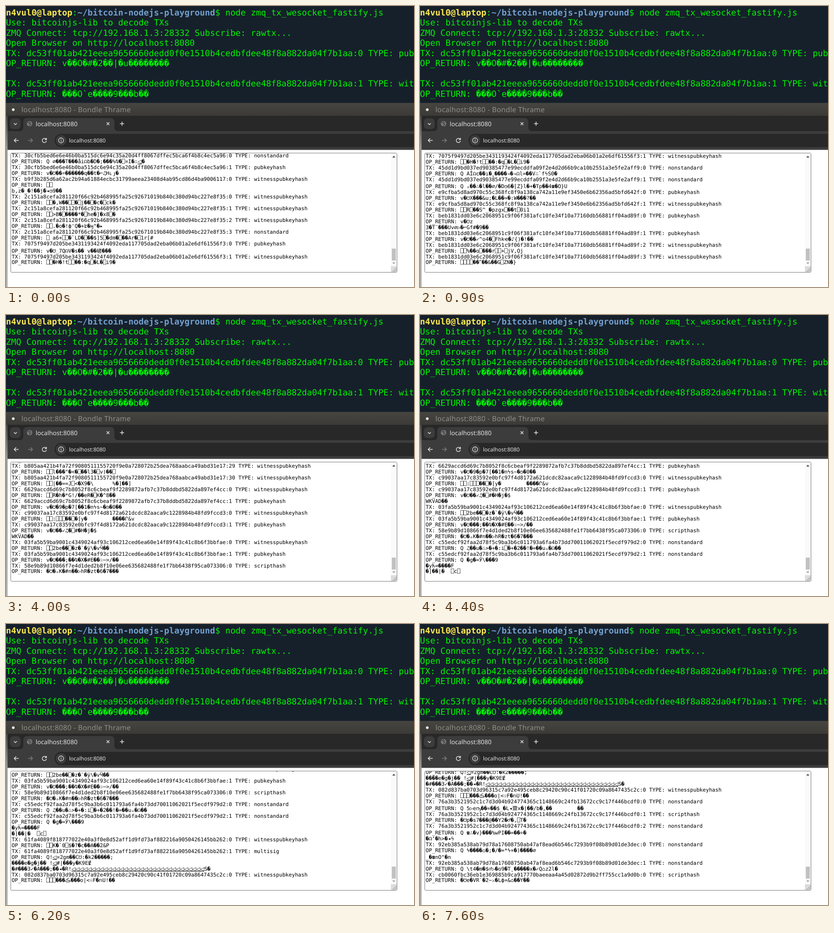
An HTML page for the animation above (8.1 s loop, 900 by 622 pixels).

```html
<!DOCTYPE html>
<html lang="en">
<head>
<meta charset="utf-8">
<title>Transaction log</title>
<style>
html, body { margin: 0; width: 100%; height: 100%; overflow: hidden; background: #fff; }
svg { display: block; width: 900px; height: 622px; }
text { white-space: pre; text-rendering: geometricPrecision; }
.term { font: 18.69px "DejaVu Sans Mono", monospace; fill: #00f200; }
.term .user { font-weight: bold; fill: #fce94f; }
.term .path { font-weight: bold; fill: #729fcf; }
.ui { font-family: "Noto Sans", "Open Sans", sans-serif; fill: #e3e3e3; }
#log { font: 11.54px "DejaVu Sans Mono", "DejaVu Sans", "Noto Sans CJK JP", "Noto Sans CJK", monospace; fill: #000; }
#log text { unicode-bidi: bidi-override; direction: ltr; }
#log .wide { font-family: "DejaVu Sans", sans-serif; text-decoration: underline; text-decoration-thickness: .6px; }
.line { fill: none; stroke: #e3e3e3; stroke-width: 1.5; }
</style>
</head>
<body>
<svg viewBox="0 0 900 622">
  <defs>
    <clipPath id="view"><rect x="11" y="326" width="838" height="263"/></clipPath>
    <linearGradient id="bar" x1="0" y1="0" x2="0" y2="1">
      <stop offset="0" stop-color="#464540"/><stop offset="1" stop-color="#3b3a36"/>
    </linearGradient>
    <linearGradient id="edge" x1="0" y1="0" x2="0" y2="1">
      <stop offset="0" stop-color="#4a4a4a"/><stop offset=".2" stop-color="#9a9a9a"/><stop offset="1" stop-color="#b0b0b0"/>
    </linearGradient>
  </defs>
  <rect width="900" height="622" fill="#fff"/>
  <rect width="900" height="215" fill="#16202b"/>
  <g class="term" id="term">
    <text x="0" y="20.7"><tspan class="user">n4vul0@laptop</tspan>:<tspan class="path">~/bitcoin-nodejs-playground</tspan>$ node zmq_tx_wesocket_fastify.js</text>
  </g>

  <rect y="214.5" width="900" height="29" fill="url(#bar)"/>
  <circle cx="16" cy="229.5" r="3" fill="#e8e8e8"/>
  <text class="ui" x="34" y="234.5" font-size="15.7" font-weight="500" letter-spacing=".3" style="fill:#918f8a">localhost:8080 - Bondle Thrame</text>

  <rect y="243" width="900" height="35" fill="#282828"/>
  <rect y="277" width="900" height="41.5" fill="#3c3c3c"/>
  <path d="M30 277q8 0 8-8V257q0-9 9-9H230q9 0 9 9v12q0 8 8 8z" fill="#3c3c3c"/>
  <rect x="8.5" y="248.5" width="24" height="24" rx="8" fill="#3c3c3c"/>
  <path class="line" d="M17.5 259.5l3.2 3.2 3.2-3.2"/>
  <circle cx="52" cy="260.5" r="6" fill="#77797b"/>
  <path d="M47.5 258q4 0 4 2t4 1M52 266q0-3 3-4M51 255q0 3 4 3" fill="none" stroke="#3c3c3c" stroke-width="1.3"/>
  <text class="ui" x="65.5" y="265.5" font-size="13.6">localhost:8080</text>
  <path class="line" d="M222 257.5l6 6m0-6l-6 6M251.5 260.5h9m-4.5-4.5v9"/>

  <path class="line" d="M28 297.5h-10m4.5-4.5l-4.5 4.5 4.5 4.5"/>
  <path class="line" d="M48.5 297.5h10m-4.5-4.5l4.5 4.5-4.5 4.5" style="stroke:#7c7c7c"/>
  <path class="line" d="M88.5 294.8a4.7 4.7 0 1 0 .8 4M89.3 292v3.7h-3.7"/>
  <rect x="107" y="283" width="830" height="29.5" rx="14.7" fill="#282828"/>
  <circle cx="121.5" cy="297.5" r="11.5" fill="#3c3c3c"/>
  <circle class="line" cx="121.5" cy="297.5" r="5.5" style="stroke-width:1.3"/>
  <path class="line" d="M121.5 296.8v3.7m0-6.2v1.4" style="stroke-width:1.3"/>
  <text class="ui" x="139" y="301.8" font-size="11.95">localhost:8080</text>
  <rect y="243" width="3.5" height="379" fill="url(#edge)"/>

  <rect x="10.5" y="325.5" width="852" height="264" rx="2" fill="#fff" stroke="#767676"/>
  <rect x="849" y="326" width="13" height="250" fill="#fafafa"/>
  <rect x="849" y="576" width="13" height="13" fill="#dcdcdc"/>
  <rect x="851" y="537" width="9" height="26.5" fill="#c1c1c1"/>
  <path d="M852 335.5h7l-3.5-4z" fill="#505050"/>
  <path d="M852 567.5h7l-3.5 4z" fill="#a3a3a3"/>
  <path d="M853 588l8-8m-4 8l4-4" stroke="#7d7d7d" stroke-width="1"/>
  <g clip-path="url(#view)"><g id="log"></g></g>
</svg>
<script>
const LOOP = 8100, PITCH = 12.98, BASE = 571.5;
const NS = 'http://www.w3.org/2000/svg';
const TYPES = { n: 'nonstandard', p: 'pubkeyhash', w: 'witnesspubkeyhash', s: 'scripthash', m: 'multisig' };
const log = document.getElementById('log');
const lines = [];

function add(name, parent, attrs, text) {
  const el = document.createElementNS(NS, name);
  for (const k in attrs) el.setAttribute(k, attrs[k]);
  el.textContent = text;
  return parent.appendChild(el);
}

const hash0 = 'TX: dc53ff01ab421eeea9656660dedd0f0e1510b4cedbfdee48f8a882da04f7b1aa';
[
  'Use: bitcoinjs-lib to decode TXs',
  'ZMQ Connect: tcp://192.168.1.3:28332 Subscribe: rawtx...',
  'Open Browser on http://localhost:8080',
  hash0 + ':0 TYPE: pubkeyhash',
  'OP_RETURN: v��O�#�2��|�u��������',
  '',
  hash0 + ':1 TYPE: witnesspubkeyhash',
  'OP_RETURN: ���O`e����9���b��'
].forEach((s, i) => add('text', document.getElementById('term'), { x: 0, y: 43.2 + 22.5 * i }, s));

// Fallback glyphs make some rows taller.
const extra = s => /[\u4e00-\u9fff]/.test(s) ? 2.6 : s.includes('☎') ? 1.73 : 0;

function addLine(time, s) {
  const last = lines[lines.length - 1];
  const y = (last ? last.y : 0) + PITCH + extra(s);
  const el = add('text', log, { x: 12.6, y }, '');
  for (const part of s.split(/(⊴+)/)) {
    if (part[0] === '⊴') add('tspan', el, { class: 'wide' }, '◁'.repeat(part.length));
    else el.append(part);
  }
  lines.push({ time, y, el });
}

// outs alternates type key and decoded script
function tx(time, hash, first, ...outs) {
  for (let i = 0; i < outs.length; i += 2) {
    addLine(time, `TX: ${hash}:${first + i / 2} TYPE: ${TYPES[outs[i]]}`);
    ('OP_RETURN: ' + outs[i + 1]).split('\n').forEach(s => addLine(time, s));
  }
}

tx(0, '30cfb5bed6e6e46b0ba515dc6e94c35a20d4ff8067dffec5bca6f4b8c4ec5a96', 0,
  'n', 'Q ⌀���T���åi☊b�D�;���%⍉�⎕¤I�∴⊴�',
  'p', 'v�☋��⌕������q��t�⌐♫Hւյ�');
tx(0, 'b9f3b285d6a62ac2b94a61884ecbc31799aeea23408d4ab95cd86d4ba9006117', 0,
  'w', '⎕⎕\nb,z�_�!��j�◂◷9��');
tx(0, '2c151a8cefa281120f66c92b468995fa25c92671019b840c380d94bc227e8f35', 0,
  'w', '⎕⎕�,W��⎕⎕�⎕j��⎕�c�⎕ck�',
  'w', '⎕⎕>B�⎕����*�⎕he�]�x8⎕�',
  'w', '⎕⎕.�o�!ф\'Q�+ʫ�ӈ"�▸',
  'n', '⎕ a6+⎕⎕�`LD�⎕��$]5⎕�dm�⎕��Ar�⎕1r[#');
tx(0, '7075f9497d205be3431193424f4092eda117705dad2eba06b01a2e6df61556f3', 0,
  'p', 'v�☋_7Q☊V�s�� v��嵯���',
  'w', '⎕⎕�H�!t⎕⎕��:�q⎕�L�⎕i9�');
tx(200, '45dd1d9bd037ed90385477e99ecddfa09f2e4d2d66b9ca10b2551a3e5fe2aff9', 0,
  'n', 'Q AÎ☊c��ı�ˬ����◃�◃☊l=��V∴`fϟS0�',
  'n', 'Q ₒ��∴�l��⌀/�D◷6�[Z}l�+�Tp��4☎�O}U');
tx(400, 'e9cfba5d8ad970c55c368fc8f9a138ca742a11e9ef3450e6b62356ad5bfd642f', 0,
  'p', 'v�☋X���&u;�L��∝�:W���?��',
  'w', '⎕⎕R⎕��S^_�pzgx⎕��t⎕0i1');
tx(900, 'beb1831dd03e6c2068951c9f06f381afc10fe34f10a77160db56881ff04ad89f', 0,
  'p', 'v�☋z\n3�T¨���Uv⌀▷�⌐Gf#�9��',
  'p', 'v�☋��✓^o4�⎕Fhkҽ�♪{)�!��',
  'w', '⎕⎕%��o⎕���r⎕⎕+⎕jV,Ọj',
  'w', '⎕⎕⎕⎕��ʺ��&��G⎕ZN�}');

const big = 'b805aa421b4fa72f9080511155720f9e0a728072b25dea768aabca49abd31e17';
tx(3200, big, 18,
  'w', '⎕⎕H��⎕�⎕�⎕��FZ�⎕k����]',
  'w', '⎕⎕P�4Q�/L�.��        :�;�dJ�S',
  'w', '⎕⎕�8���"���y���i     ��Bo[',
  'w', '⎕⎕��WR�K�i�▷☎����◂�',
  'w', '⎕⎕�єl��!�#�V��ϟ~7�1s',
  'w', '⎕⎕���⎕⎕�ѯ�2��*�ے⌕�W�',
  'w', '⎕⎕%!g5f��ﻱ�▸����bj♪Z�',
  'w', '⎕⎕e$}�⎕��»��Ȯf�����8',
  'w', '⎕⎕����⎕⎕�=�[�⎕.��Bk⎕<',
  'w', '⎕⎕�B��⎕���H⎕�����|T�}P');
tx(3400, big, 28,
  'w', '⎕⎕�k��⎕3�w���Q:⎕��e�a�',
  'w', '⎕⎕l���"�<�⎕��l3�⎕v)��⎕',
  'w', '⎕⎕|��==J⎕<�X9�\\      %�]��]');
tx(3400, '6629accd6d69c7b8052f8c6cbeaf9f2289872afb7c37b8ddbd5822da897ef4cc', 0,
  'w', '⎕⎕R�h�*G!/��eR�⎕K�^8��',
  'p', 'v�☋�9�p�7[��1�nϟs~�◷�0��');
tx(3400, 'c99037aa17c83592e0bfc97f4d8172a621dcdc82aaca9c1228984b48fd9fccd3', 0,
  'w', '⎕⎕:⎕⎕⎕��⎕�[y�        ����Ր&v',
  'p', 'v�☋��✓♫�⎕#�H�j�$\nWKVAD��');
tx(3900, '03fa5b59ba9001c4349024af93c106212ced6ea60e14f89f43c41c8b6f3bbfae', 0,
  'w', '⎕⎕2be��⎕�z�`�ÿ\\�vӴ��',
  'p', 'v�☋���;��⍉�X�#E��☉~>/��');
tx(4000, '58e9b89d10866f7e4d1ded2b8f10e06ee635682488fe1f7bb6438f95ca073306', 0,
  's', '�☋�ₒK�#n��▷hR�zt�6�7���');

const pair = 'c55edcf92faa2d78f5c9ba3b6c011793a6fa4b73dd70011062021f5ecdf979d2';
tx(4300, pair, 0, 'n', 'Q ♫��u�∴>�+�:i⎕�+�2��!�=��uₒ�☊��');
tx(4400, pair, 1, 'n', 'Q �g�=Ў\\���9\n�yћ=����F\n�]��|�  ⎕c⎕');

const multi = '61fa4089f818777022e40a3f0e8d52aff1d9fd73af882216a9050426145bb262';
tx(5000, multi, 0, 'w', '⎕⎕K�`0⎕$�?�c��Ạ��2&P');
tx(5100, multi, 1,
  'm', 'Q!⊴¤2gm��C☋:�k2�����;\n����e�g�j�� !⊴#|���y�K9EɆ\n�#���3✓�A���;��◂�R!' + '⊴'.repeat(33) + 'S�');
tx(6200, '082d837ba0703d96315c7a92e495ceb8c29420c90c41f01720c09a8647435c2c', 0,
  'w', '⎕⎕⎕���ڪ���o|<☉F�חU!��');
tx(6400, '76a3b3521952c1c7d3d04b924774365c1148669c24fb13672cc9c17f446bcdf0', 0,
  'n', 'Q 5▷eҧ��∝��$_�L◂齌x�|��/b�,��        ��',
  's', '�☋p�s7���@��Y2�♂�,⎕T�',
  'n', 'Q ☎∴�v}���%wPI��=��÷�\n�☊ʻ�h>�◂ϟ');
tx(7600, '92eb385a538ab79d78a17608750ab47af8ead6b546c7293b9f08b89d01de3dec', 0,
  'n', 'Q ϟ����⌂�;�/�=*ϟ∝�)����⌀\n_�☎nO"�n',
  'n', 'Q \\t4�m�$♂▷�o9�T˛�����x�✓Q⌂z2l�');
tx(7600, 'cb0060fbc36eb1e369885b9ca917770baeeaa4a45d02872d9b2ff755cc1a9d0b', 0,
  's', '�☋e�VR`�2~⚔�Lф∝&⌂��Y��');

let shown = -1;
function draw(t) {
  const n = lines.filter(l => l.time <= t).length;
  if (n === shown) return;
  shown = n;
  lines.forEach((l, i) => { l.el.style.display = i < n ? '' : 'none'; });
  log.setAttribute('transform', `translate(0 ${BASE - lines[n - 1].y})`);
}

const start = performance.now();
function tick() {
  draw((performance.now() - start) % LOOP);
  requestAnimationFrame(tick);
}
tick();
</script>
</body>
</html>
```
